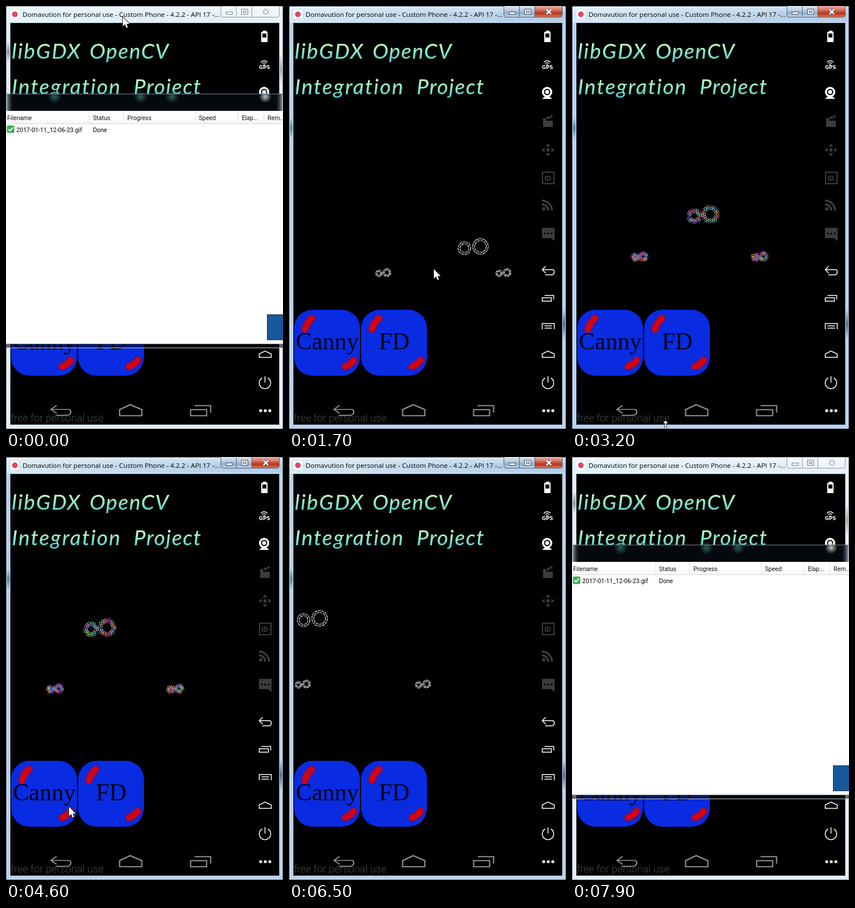
An HTML page with a canvas for the animation above (8.1 s loop, 484 by 738 pixels).

```html
<!DOCTYPE html>
<html lang="en">
<head>
<meta charset="utf-8">
<title>Vision demo</title>
<style>
html, body { margin: 0; width: 484px; height: 738px; overflow: hidden; background: #000; }
canvas { display: block; }
</style>
</head>
<body>
<canvas id="stage" width="484" height="738"></canvas>
<script>
const ctx = document.getElementById('stage').getContext('2d');
const LOOP = 8100, STEP = 100;

const stalls = [[700, 1100], [1900, 2200], [3000, 3100], [3700, 3900], [4700, 4800], [5600, 5700], [6200, 6500]];

// Way points: [time, x, y]
const drift = [[1000, 0, 0], [2600, -131, -66], [3200, -150, -85], [4600, -215, -151], [6500, -338, -167]];
const pointer = [
  [100, 204, 19], [700, 384, 126], [1300, 438, 230], [1900, 160, 574], [2600, 160, 574], [3200, 163, 733],
  [3800, 150, 760], [4600, 110, 610], [5600, 323, 169], [6500, 500, 160], [7000, 490, 376], [7700, 52, 760]
];

function at(points, t) {
  const i = points.findIndex(p => p[0] > t);
  if (i <= 0) return points.at(i).slice(1);
  const [t0, x0, y0] = points[i - 1], [t1, x1, y1] = points[i], p = (t - t0) / (t1 - t0);
  return [Math.round(x0 + (x1 - x0) * p), Math.round(y0 + (y1 - y0) * p)];
}

function random(seed) {
  return () => (seed = (seed * 16807 + 12345) % 2147483647) / 2147483647;
}

function rect(color, x, y, w, h) {
  ctx.fillStyle = color;
  ctx.fillRect(x, y, w, h);
}

function box(color, x, y, w, h) {
  ctx.strokeStyle = color;
  ctx.lineWidth = 1;
  ctx.strokeRect(x + .5, y + .5, w - 1, h - 1);
}

function rounded(color, x, y, w, h, r) {
  ctx.beginPath();
  ctx.roundRect(x, y, w, h, r);
  ctx.fillStyle = color;
  ctx.fill();
}

function gradient(x0, y0, x1, y1, ...colors) {
  const g = ctx.createLinearGradient(x0, y0, x1, y1);
  colors.forEach((c, i) => g.addColorStop(i / (colors.length - 1), c));
  return g;
}

function glow(x, y, r, color) {
  const g = ctx.createRadialGradient(x, y, 0, x, y, r);
  g.addColorStop(0, color);
  g.addColorStop(1, color + '00');
  rect(g, x - r, y - r, 2 * r, 2 * r);
}

function text(s, x, y, font, color, spacing = 0) {
  ctx.font = font;
  ctx.fillStyle = color;
  ctx.letterSpacing = spacing + 'px';
  ctx.fillText(s, x, y);
}

function line(d, color, width = 1.5) {
  ctx.strokeStyle = color;
  ctx.lineWidth = width;
  ctx.stroke(new Path2D(d));
}

function shape(d, color) {
  ctx.fillStyle = color;
  ctx.fill(new Path2D(d));
}

function disc(x, y, r, color) {
  ctx.beginPath();
  ctx.arc(x, y, r, 0, 7);
  ctx.fillStyle = color;
  ctx.fill();
}

function ring(x, y, r, color, width = 1, from = 0, to = 7) {
  ctx.beginPath();
  ctx.arc(x, y, r, from, to);
  ctx.strokeStyle = color;
  ctx.lineWidth = width;
  ctx.stroke();
}

function windowFrame(active) {
  rect(active ? '#b5d0ec' : '#e4eef6', 0, 0, 484, 738);
  rect(active ? gradient(0, 0, 484, 0, '#d3e6f3', '#b4d2e9', '#a5c5e5')
              : gradient(0, 0, 484, 0, '#def3f8', '#dcebf5', '#e6f0f7'), 0, 0, 484, 29);
  rect(gradient(0, 0, 0, 29, '#ffffff90', '#ffffff10', '#ffffff30'), 0, 0, 484, 29);
  glow(2, active ? 213 : 80, 18, active ? '#3e8495' : '#7d8d9c');
  glow(482, active ? 555 : 110, 26, active ? '#355b83' : '#8c9dac');
  box(active ? '#3c5068' : '#75828f', 0, 0, 484, 738);
  box('#ffffffb0', 1, 1, 482, 736);
  box('#ffffff90', 6, 28, 473, 704);
  box(active ? '#5d7690' : '#7c8a96', 7, 29, 471, 702);
  rect('#000', 8, 30, 469, 700);

  rounded('#fff', 8, 7, 15, 15, 3);
  disc(15.5, 14.5, 5, '#dc4a66');
  ctx.shadowColor = '#fff';
  ctx.shadowBlur = 7;
  text('Domavution for personal use - Custom Phone - 4.2.2 - API 17 -...', 29, 19,
    '11.65px "Open Sans", sans-serif', '#000');
  ctx.shadowBlur = 0;
  captionButtons(active);
}

function captionButtons(active) {
  const clear = '#ffffff40', ink = active ? '#46505e' : '#717a84';
  const grey = active ? gradient(0, 0, 0, 19, '#dbe7f2', '#bed0e2', '#93aecb', '#b9d2e8') : clear;
  const red = active ? gradient(0, 0, 0, 19, '#e9b3a5', '#d77b68', '#b9341b', '#d9764f') : clear;
  [375.5, 402.5, 429.5].forEach((x, i) => {
    rounded(i < 2 ? grey : red, x, -1, i < 2 ? 27 : 48, 20.5, [0, 0, i === 2 ? 4 : 0, i === 0 ? 4 : 0]);
    ctx.strokeStyle = active ? '#50657c' : '#8b9aa8';
    ctx.lineWidth = 1;
    ctx.stroke();
  });
  rect('#fff', 384, 10, 12, 5);
  box(ink, 384, 10, 12, 5);
  rect('#fff', 411, 5, 12, 10);
  box(ink, 411, 5, 12, 10);
  box(ink, 414, 8, 6, 4);
  const cross = 'M450 6 L458 14 M458 6 L450 14';
  line(cross, ink, 4.5);
  line(cross, '#fff', 2.5);
}

function heading() {
  [['libGDX', 'OpenCV', 146], ['Integration', 'Project', 223]].forEach(([first, second, x], row) => {
    const y = 92 + 62 * row, font = 'italic 500 37px Lato, sans-serif';
    const fill = gradient(0, y - 28, 0, y + 8, '#ccffbe', '#84e6c8', '#40c4cc');
    text(first, 10, y, font, fill, 2);
    text(second, x, y, font, fill, 1.5);
  });
}

const outlineIcons = {
  back: 'M8 -5 H-10 M-4 -11 L-10 -5 L-4 1 M8 -5 Q11 -5 11 -1 Q11 4 6 4 H-5',
  recents: 'M-10 -1 H6 V5 H-10 Z M-6 -5 H10 V2',
  menu: 'M-10 5 V-5 H11 V5 M-6 -1 H7 M-6 3 H7',
  home: 'M-10 5 V-1 L0 -6 L11 -1 V5 Z',
  power: 'M-5 -8 A10 10 0 1 0 5 -8 M0 -11 V0'
};

function icon(name, x, y, color, sx = 1, sy = sx, width = 1.5) {
  ctx.save();
  ctx.translate(x, y);
  ctx.scale(sx, sy);
  line(outlineIcons[name], color, width);
  ctx.restore();
}

function sidebar() {
  const dim = '#3c3c3c', white = '#fff';
  rect(white, 449, 43, 6, 3);
  rect(white, 446, 45, 11, 18);
  rect('#000', 448, 48, 7, 7);

  disc(451, 103, 1.5, white);
  [4, 7.5].forEach(r => ring(451, 103, r, white, 1.5, -2.45, -.7));
  text('GPS', 442, 110, 'bold 8.5px "DejaVu Sans", sans-serif', white);

  disc(451, 150, 9, white);
  ring(451, 150, 4.5, '#000', 2);
  shape('M447 158 H455 L460 162 H442 Z', white);

  rect(dim, 444, 200, 17, 11);
  shape('M443 197 L459 190 L461 194 L445 201 Z', dim);
  line('M448 193 L451 198 M454 190 L457 195', '#000');

  disc(452.5, 251, 3, dim);
  for (let i = 0; i < 4; i++) {
    ctx.save();
    ctx.translate(452.5, 251);
    ctx.rotate(i * Math.PI / 2);
    shape('M0 -11 l4 5 h-8 z', dim);
    ctx.restore();
  }

  line('M443 290 h20 v20 h-20 z', dim, 2);
  text('ID', 446, 305, 'bold 13px Roboto, sans-serif', dim);

  disc(445, 354, 3, dim);
  [11, 17.5].forEach(r => ring(442, 357, r, dim, 3.5, -Math.PI / 2, 0));

  shape('M442 387 H464 V410 L458 405 H442 Z', dim);
  for (let i = 0; i < 3; i++) {
    disc(447 + 6 * i, 397, 1.7, '#000');
    disc(445 + 8 * i, 706, 2.6, white);
  }
  Object.keys(outlineIcons).forEach((name, i) =>
    icon(name, 452.5, 461 + 49 * i + (i ? 0 : 4), white));
}

function bean(d) {
  ctx.lineCap = 'round';
  line(d, '#74105c', 13.5);
  line(d, '#d20612', 10);
  ctx.lineCap = 'butt';
}

function appButton(x, label, labelX) {
  rounded('#092be2', x, 530, 115, 115, 32);
  bean(`M${x + 19} 564 Q${x + 22} 552 ${x + 31} 545`);
  bean(`M${x + 89} 629 Q${x + 97} 627 ${x + 104} 618`);
  text(label, labelX, 599, '42px "Liberation Serif", serif', '#020412');
}

function navigation() {
  const grey = '#909090';
  icon('back', 95, 709.5, grey, 1.65, 1.15, 1.4);
  icon('home', 217, 706, grey, 1.85, 1.75, 1.2);
  icon('recents', 340, 706, grey, 1.75, 1.75, 1.2);
  text('free for personal use', 8, 725, '300 18px Roboto, sans-serif', '#464646');
}

function keypoints(x, y, radii, rnd) {
  const count = Math.round(radii[0] * 2.6);
  for (let i = 0; i < count; i++) {
    const a = (i + rnd()) / count * Math.PI * 2, r = radii[i % 2];
    const color = `hsl(${rnd() * 360} 80% ${50 + rnd() * 25}%)`;
    ring(x + Math.cos(a) * r, y + Math.sin(a) * r, 2.1, color, .9);
  }
}

// A small and a large circle side by side; far pairs are smaller and move less
function circlePair(x, y, scale, features, rnd) {
  for (let i = 0; i < 2; i++) {
    const cx = x + 28 * i * scale, cy = y - 3 * i * scale;
    const r = (11 + 2.5 * i) * scale, radii = [r, r - 1 - 2.3 * scale];
    if (features) keypoints(cx, cy, radii, rnd);
    else {
      ctx.setLineDash([5, 1]);
      radii.forEach(radius => ring(cx, cy, radius, '#fff', 1.1));
      ctx.setLineDash([]);
    }
  }
}

function scene(t) {
  const [dx, dy] = at(drift, t), features = t >= 2700 && t < 4800;
  const rnd = random(1000 - dx * 17 - dy * 31);
  circlePair(363.5 + dx, 451.5 + dy, 1, features, rnd);
  [185.5, 395.5].forEach(x => circlePair(x + dx / 2, 481 + dy / 2, .5, features, rnd));
}

function listWindow() {
  const font = '10.6px Roboto, sans-serif', glass = '#05090e';
  rect(glass, 0, 153, 484, 30);
  rect(gradient(0, 0, 14, 0, '#a9bccb', glass + '00'), 0, 154, 14, 29);
  rect(gradient(470, 0, 484, 0, glass + '00', '#a9bccb'), 470, 154, 14, 29);
  [85, 235, 290].forEach(x => glow(x, 158, 12, '#2c5e5a'));
  glow(453, 158, 11, '#b8c4cc');
  rect('#77838c', 0, 153, 484, 1);

  rect('#fff', 0, 183, 484, 406);
  rect(gradient(0, 183, 0, 206, '#fff', '#fff', '#f2f3f5'), 0, 183, 484, 23);
  rect('#d7d9dc', 0, 205, 484, 1);
  const columns = { Filename: 2, Status: 152, Progress: 212, Speed: 337, 'Elap...': 412, 'Rem...': 457 };
  for (const [label, x] of Object.entries(columns)) {
    rect('#dfe2e7', x - 7, 183, 1, 22);
    text(label, x, 199, font, '#111');
  }
  rounded('#36b04a', 1.5, 208.5, 13, 13, 2);
  line('M4 215 L7 218 L12 212', '#fff', 2);
  text('2017-01-11_12-06-23.gif', 18, 220, font, '#000');
  text('Done', 152, 220, font, '#000');
  rect('#26303a', 456, 538, 28, 45);
  rect('#17589d', 457, 539, 27, 43);

  rect(glass + '90', 0, 589, 484, 8);
  rect('#8d989f', 0, 589, 484, 1);
  rect('#c3cdd2', 0, 596, 484, 1);
}

function drawPointer(t) {
  const [x, y] = at(pointer, t);
  const resizing = y > 728;
  const d = resizing
    ? 'M0.5 -10 L4.5 -5 H1.5 V5 H4.5 L0.5 10 L-3.5 5 H-0.5 V-5 H-3.5 Z'
    : 'M0 0 V16.5 L4 13 L6.5 19 L9 18 L6.5 12.2 H11.8 Z';
  ctx.save();
  ctx.translate(x, y);
  line(d, '#000', 1.6);
  shape(d, '#fff');
  ctx.restore();
}

function draw(now) {
  let t = Math.floor(now % LOOP / STEP) * STEP;
  const stall = stalls.find(([from, to]) => t >= from && t < to);
  if (stall) t = stall[0];
  windowFrame(t >= 200 && t < 6600);
  heading();
  sidebar();
  appButton(9, 'Canny', 12);
  appButton(126, 'FD', 157);
  navigation();
  scene(t);
  if (t < 200 || t >= 7900) listWindow();
  drawPointer(t);
}

const start = performance.now();
function tick() {
  draw(performance.now() - start);
  requestAnimationFrame(tick);
}
tick();
</script>
</body>
</html>
```
